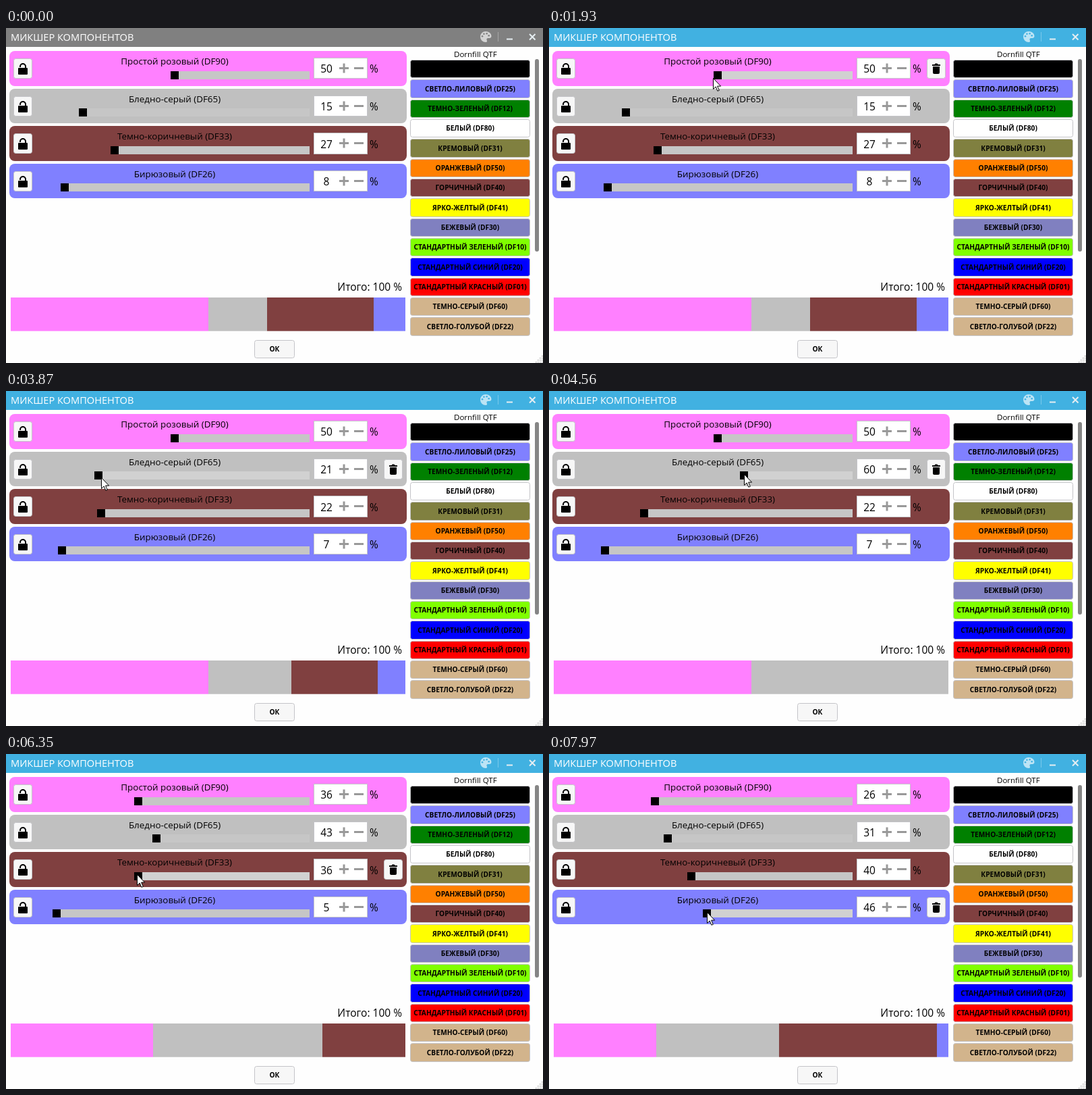
These frames come from a looping animation (796 px wide and 496 px high, 8 s). An HTML page:

```html
<!DOCTYPE html>
<html lang="ru">
<head>
<meta charset="utf-8">
<title>Микшер компонентов</title>
<style>
  html, body { margin: 0; width: 100%; height: 100%; overflow: hidden; background: #fefefe; }
  svg { display: block; font-family: "Open Sans", "Noto Sans", sans-serif; }
  .mid { text-anchor: middle; }
  .label { font-size: 13.4px; }
  .value { font-size: 15.5px; }
  .caption { font-size: 10.2px; font-weight: 700; }
</style>
</head>
<body>
<svg width="796" height="496" viewBox="0 0 796 496">
  <g id="chrome"></g>
  <g id="live"></g>
</svg>
<script>
const LOOP = 8000, TICK = 77.2;
const ACTIVATE = 15;      // tick at which the window gets focus
const SETTLE = 8;         // ticks from a drop until the shares are rescaled to 100 %
const ROW_PITCH = 55.6, SWATCH_PITCH = 29.33;
const snap = Math.round;

const rows = [
  ['Простой розовый (DF90)', '#ff80ff'],
  ['Бледно-серый (DF65)', '#c0c0c0'],
  ['Темно-коричневый (DF33)', '#804040'],
  ['Бирюзовый (DF26)', '#8080ff']
].map(([name, color], i) => ({ name, color, top: 34 + i * ROW_PITCH }));

const palette = [
  ['', '#000'],
  ['СВЕТЛО-ЛИЛОВЫЙ (DF25)', '#8080ff'],
  ['ТЕМНО-ЗЕЛЕНЫЙ (DF12)', '#008000'],
  ['БЕЛЫЙ (DF80)', '#fff'],
  ['КРЕМОВЫЙ (DF31)', '#808040'],
  ['ОРАНЖЕВЫЙ (DF50)', '#ff8000'],
  ['ГОРЧИЧНЫЙ (DF40)', '#804040'],
  ['ЯРКО-ЖЕЛТЫЙ (DF41)', '#ff0'],
  ['БЕЖЕВЫЙ (DF30)', '#8080c0'],
  ['СТАНДАРТНЫЙ ЗЕЛЕНЫЙ (DF10)', '#80ff00'],
  ['СТАНДАРТНЫЙ СИНИЙ (DF20)', '#00f'],
  ['СТАНДАРТНЫЙ КРАСНЫЙ (DF01)', '#f00'],
  ['ТЕМНО-СЕРЫЙ (DF60)', '#d2b48c'],
  ['СВЕТЛО-ГОЛУБОЙ (DF22)', '#d2b48c']
];

// The pointer goes to a point, reaches for a row's thumb, or drags that thumb to a value
const go = (from, to, x, y) => ({ from, to, x, y });
const reach = (from, to, row) => ({ from, to, row });
const drag = (from, to, row, value) => ({ from, to, row, value });
const script = [
  go(1, 13, 247, 68), go(16, 19, 299, 70), go(20, 23, 243, 74),
  drag(26, 30, 0, 62), go(30, 34, 236, 87),
  reach(34, 37, 1), drag(40, 42, 1, 23.1), go(42, 50, 141, 128),
  drag(56, 59, 1, 60), go(60, 67, 212, 191),
  reach(67, 73, 2), drag(81, 83, 2, 55.5), go(84, 88, 133, 235),
  reach(91, 100, 3), drag(101, 103, 3, 46)
];

const thumbX = value => 56 + value * 3.88;
const mix = (a, b, k) => a + (b - a) * k;
const smooth = k => k * k * (3 - 2 * k);

function stateAt(tick) {
  let values = [50, 15, 27, 8], pointer = { x: 127, y: 348 };
  for (const { from, to, row, value, x, y } of script) {
    if (tick <= from) break;
    const linear = Math.min(1, (tick - from) / (to - from));
    const k = value ? linear : smooth(linear);
    const target = row === undefined ? { x, y }
      : { x: thumbX(value || values[row]), y: rows[row].top + 33 };
    pointer = { x: mix(pointer.x, target.x, k), y: mix(pointer.y, target.y, k) };
    if (!value) continue;
    values[row] = mix(values[row], value, k);
    if (tick >= to + SETTLE) {
      const sum = values.reduce((a, b) => a + b);
      values = values.map(v => v * 100 / sum);
    }
  }
  return { values: values.map(Math.round), pointer: tick >= script[0].from ? pointer : null };
}

const rect = (x, y, w, h, fill, extra = '') =>
  `<rect x="${x}" y="${y}" width="${w}" height="${h}" fill="${fill}" ${extra}/>`;
const text = (x, y, str, cls, extra = '') => `<text x="${x}" y="${y}" class="${cls}" ${extra}>${str}</text>`;
const framed = (x, top, w, bottom, fill = '#f7f7f7', radius = 3) =>
  rect(x + .5, top + .5, w - 1, bottom - top - 1, fill, `rx="${radius}" stroke="#c4c4c8"`);
const stroke = (d, color, width) => `<path d="${d}" fill="none" stroke="${color}" stroke-width="${width}"/>`;

function drawChrome() {
  let out = text(664, 43, 'Dornfill QTF', '', 'font-size="11.5"');
  palette.forEach(([name, color], i) => {
    const top = 47 + i * SWATCH_PITCH;
    out += framed(599, snap(top), 178, snap(top + 27.4), color)
      + text(688, snap(top + 17.4), name, 'caption mid');
  });
  out += rect(784, 46, 6, 285, '#858585', 'rx="3"');
  out += text(587, 389, 'Итого: 100 %', 'value', 'text-anchor="end"');
  out += framed(368, 462, 60, 489) + text(398, 479, 'ОК', 'caption mid');
  for (let i = 0; i < 4; i++)
    for (let j = 3 - i; j < 4; j++) out += rect(785 + i * 3, 485 + j * 3, 1.5, 1.5, '#b0b0b0');
  return out;
}

function drawTitle(active) {
  const bg = active ? '#41b1e1' : '#808080';
  let out = rect(0, 0, 796, 28, bg)
    + text(7, 19, 'МИКШЕР КОМПОНЕНТОВ', '', 'fill="#fff" font-size="14.6"')
    + '<path d="M711 5a8 8 0 0 0 0 16c2 0 2.600-1.500 1.800-2.800-1-1.700 0-3.200 1.700-3.200h2c1.800 0 3-1 3-3 0-4-4-7-8.500-7z" fill="#fff" opacity=".65"/>'
    + rect(729, 6, 1, 14, '#fff', 'opacity=".3"')
    + stroke('M742 16.500h9M776 9l8.500 8.500m0-8.500l-8.500 8.500', '#e6eef2', 2);
  for (let i = 0; i < 4; i++) {
    const a = Math.PI * (1.05 + i * .28);
    out += `<circle cx="${711 + 5 * Math.cos(a)}" cy="${13 + 5 * Math.sin(a)}" r="1.300" fill="${bg}"/>`;
  }
  return out;
}

const lock = y => framed(11, y, 28, y + 30)
  + rect(18, y + 14, 14, 10, '#000', 'rx="1"')
  + stroke(`M21 ${y + 13}v-1a4 4 0 0 1 8 0v3`, '#000', 2);

const trash = y => framed(560, y, 28, y + 30)
  + `<path d="M568 ${y + 9}h3.500l1-1.500h3l1 1.500h3.500v2h-12zM569 ${y + 12}h10v9q0 2-2 2h-6q-2 0-2-2z"/>`;

function drawRow({ name, color, top }, value, pointer) {
  const at = offset => snap(top + offset);
  const over = (left, right, from, to) => pointer && pointer.x >= left && pointer.x < right
    && pointer.y >= at(from) && pointer.y < at(to);
  const thumb = snap(thumbX(value)), track = at(29.6), mid = at(25) + .5, base = at(32.4);
  return rect(5, at(0), 589, at(51.5) - at(0), color, 'rx="8"')
    + lock(at(11))
    + text(250, at(20), name, 'label mid')
    + rect(thumb, track, 450 - thumb, 12, over(50, 450, 29.6, 41.6) ? '#d1d1d1' : '#c6c6c6')
    + rect(thumb - 6, track, 12, 12, '#000')
    + framed(456, at(10), 80, at(41.4), '#fff', 0)
    + text(475, base, value, 'value mid')
    + stroke(`M494 ${mid}h14m-7-7v14M516 ${mid}h14`, '#999', 3)
    + text(539, base, '%', 'value')
    + (over(5, 594, 0, 51.5) ? trash(at(11)) : '');
}

function drawBar(values) {
  const left = 7.2, width = 585;
  let sum = 0;
  const edge = () => snap(left + Math.min(sum, 100) / 100 * width);
  return values.map((v, i) => {
    const start = edge();
    sum += v;
    return rect(start, 399, edge() - start, 49.7, rows[i].color);
  }).join('');
}

const drawPointer = ({ x, y }) =>
  `<path transform="translate(${snap(x) + .5} ${snap(y) + .5})" fill="#fff" stroke="#000"
    d="M0 0v16l3.700-3.500 2.700 6.300 2.400-1-2.700-6.200h5z"/>`;

const live = document.getElementById('live');
document.getElementById('chrome').innerHTML = drawChrome();

let shown = -1;
function frame() {
  const tick = Math.floor((performance.now() % LOOP + 9) / TICK);
  if (tick !== shown) {
    shown = tick;
    const { values, pointer } = stateAt(tick);
    live.innerHTML = drawTitle(tick >= ACTIVATE)
      + rows.map((row, i) => drawRow(row, values[i], pointer)).join('')
      + drawBar(values)
      + (pointer ? drawPointer(pointer) : '');
  }
  requestAnimationFrame(frame);
}
frame();
</script>
</body>
</html>
```
